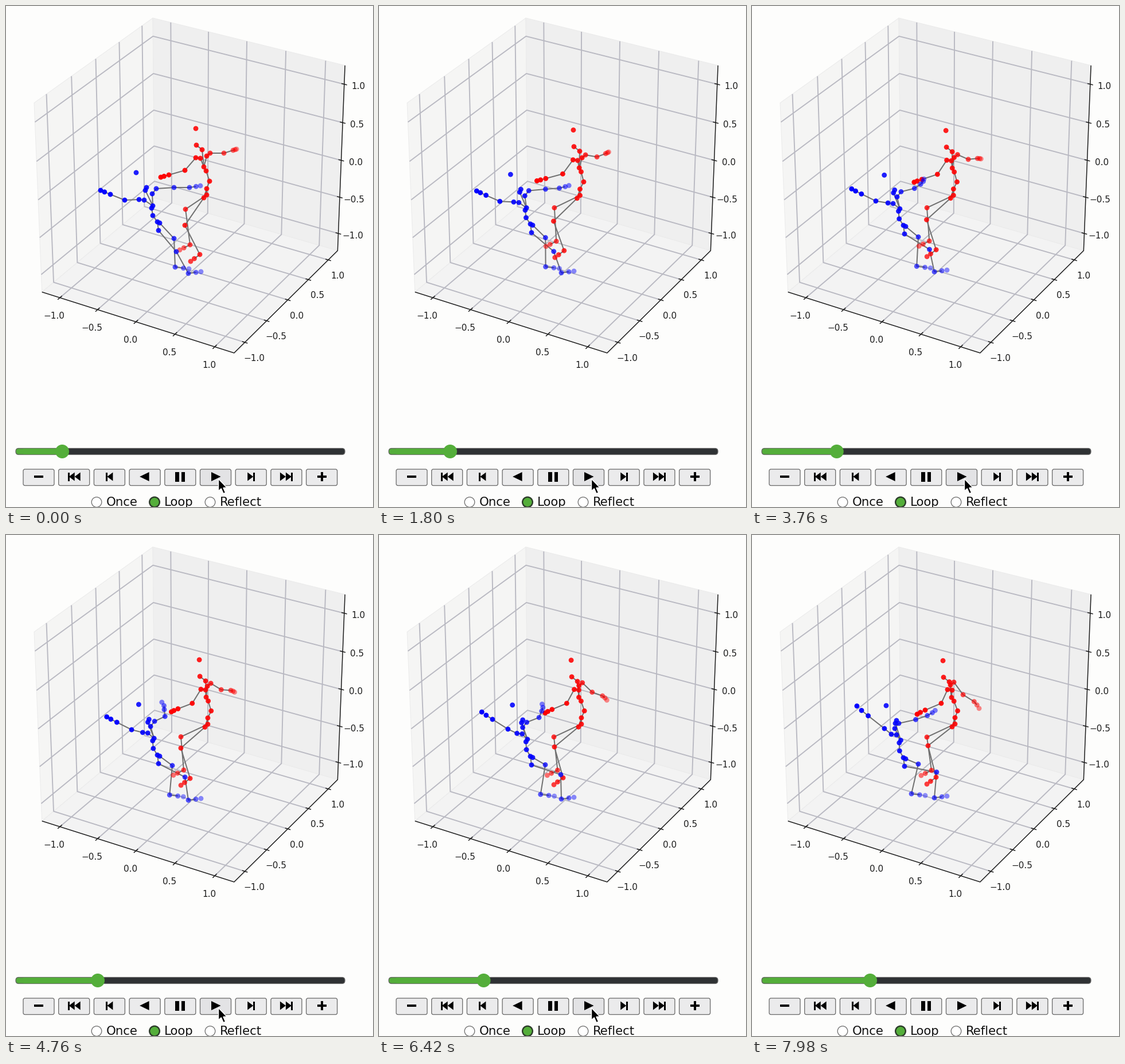
A matplotlib script that plays this animation: 640x875 px, repeating every 8000 ms.

```python
import numpy as np
import matplotlib.pyplot as plt
from matplotlib.animation import FuncAnimation
from matplotlib.collections import LineCollection, PolyCollection
from matplotlib.patches import Circle, FancyBboxPatch, Polygon

W, H, LOOP, STEP = 640, 875, 8000, 20
PX = 0.72  # points per pixel at 100 dpi
BG, GREEN, DARK = "#fdfdfc", "#54ae3a", "#2f3234"

fig = plt.figure(figsize=(W / 100, H / 100), dpi=100, facecolor=BG)
ax = fig.add_axes([0, 0, 1, 1])
ax.set(xlim=(0, W), ylim=(H, 0))
ax.axis("off")

# ---------- 3D box ----------
ELEV, AZIM = np.radians([30, -60])
EYE = 10      # camera distance in box widths
UNIT = 0.403  # box widths per axis unit


def project(x, y, z):
    """Perspective view of a point in a box that spans -0.5 to 0.5."""
    se, ce, sa, ca = np.sin(ELEV), np.cos(ELEV), np.sin(AZIM), np.cos(AZIM)
    right = -sa * x + ca * y
    up = -se * ca * x - se * sa * y + ce * z
    depth = EYE - (ce * ca * x + ce * sa * y + se * z)
    return np.array([324.5 + 3868 * right / depth, 303.5 - 3772 * up / depth])


A, B = -0.5, 0.5
square = [(A, A), (A, B), (B, B), (B, A)]
panes = [[project(A, u, v) for u, v in square],
         [project(u, B, v) for u, v in square],
         [project(u, v, A) for u, v in square]]
ax.add_collection(PolyCollection(panes, facecolors=["#f5f5f4", "#efefef", "#f3f3f3"],
                                 edgecolors="#ebebeb", linewidths=PX))

# each grid line runs from its tick over two panes; then the label offset
axes3d = [
    (lambda v: [(v, A, A), (v, B, A), (v, B, B)], (-10, 32)),
    (lambda v: [(B, v, A), (A, v, A), (A, v, B)], (16, 28)),
    (lambda v: [(B, B, v), (A, B, v), (A, A, v)], (25, 4)),
]
grid, ticks = [], []
for path, offset in axes3d:
    for v in np.linspace(-1, 1, 5):
        line = [project(*p) for p in path(v * UNIT)]
        grid.append(line)
        tick = line[0]
        d = (line[1] - tick) / np.hypot(*(line[1] - tick))
        ticks.append([tick - 5 * d, tick + 5 * d])
        ax.text(*(tick + offset), f"{v:.1f}".replace("-", "\u2212"), fontsize=15.2 * PX,
                family="DejaVu Sans", color="#1a1a1a", ha="center", va="center")
ax.add_collection(LineCollection(grid, colors="#b9b9c2", linewidths=1.9 * PX))
rim = [project(*p) for p in ((A, A, A), (B, A, A), (B, B, A), (B, B, B))]
ax.add_collection(LineCollection([rim] + ticks, colors="#1c1c1c", linewidths=1.5 * PX))


# ---------- two skeletons ----------
def phases(t):
    """Weights of the quick first step, the slow drift and the passing wave."""
    return np.array([1 - np.exp(-t / 800), (t / LOOP) ** 1.4,
                     np.exp(-((t - 5300) / 1300) ** 2 / 2)])


class Limb:
    """Joints that shift with a few anchors; spread places them between these."""

    def __init__(self, points, moves, spread):
        self.points = np.array(points, float)
        if len(points) < len(spread):  # hand or foot before the end point
            a, b = self.points[-2:]
            self.points = np.insert(self.points, -1, a + 0.6 * (b - a), axis=0)
        self.moves = np.array([(m + ((0, 0),))[:3] for m in moves])
        self.spread = spread

    def at(self, t):
        shift = np.tensordot(phases(t), self.moves, (0, 1))
        steps = range(len(shift))
        return self.points + np.transpose([np.interp(self.spread, steps, s) for s in shift.T])


TRUNK = [0, 0, 0, .5, .6, .8, 1]
ARM = [0, 0, 1, 1.55, 1.78, 2]
LEG = [0, 1, 2, 2, 2]

# moves: (first step, drift[, wave]) per anchor
red_hip = ((0, 1), (4, -1))
red = [
    Limb([(331, 214), (332, 243), (342, 251), (345, 281), (349, 288), (355, 306), (350, 319)],
         [((10, 2.5), (-8, 3)), red_hip], TRUNK),
    Limb([(339, 266), (331, 265), (312, 287), (284, 295), (270, 299)],
         [((8, 4), (2, 1)), ((8, 7), (10, 0)), ((4, 6), (13, 8), (9, 0))], ARM),
    Limb([(350, 262), (356, 257), (380, 257), (396, 252), (402, 250)],
         [((6, 4), (-10, -4)), ((2, 5), (-14, 17)), ((-1, -2), (-5, 55))], ARM),
    Limb([(350, 330), (313, 355), (321, 417), (303, 426)],
         [red_hip, ((-8, -3), (0, 1)), ((-14, -7), (6, 1))], LEG),
    Limb([(345, 335), (312, 383), (338, 434), (322, 446)],
         [red_hip, ((-9, -7), (4, -8)), ((-17, -7), (0, -4))], LEG),
]
blue_hip = ((0, 3), (0, 9))
blue = [
    Limb([(227, 291), (245, 317), (243, 322), (256, 349), (254, 353), (256, 366), (264, 377)],
         [((2, 3), (5, 4)), blue_hip], TRUNK),
    Limb([(241, 339), (232, 338), (207, 339), (182, 329), (165, 322)],
         [((2, 4), (9, 6)), ((1, 3), (23, -4)), ((4, 5), (14, -29), (0, 5))], ARM),
    Limb([(255, 328), (262, 319), (293, 317), (320, 317), (339, 314)],
         [((0, 3), (-6, 7)), ((-2, 3), (-4, 3), (-13, -5)),
          ((-6, 1), (-6, -6), (-64, -22))], ARM),
    Limb([(268, 379), (293, 406), (295, 456), (319, 459)],
         [blue_hip, ((-3, -1), (0, -5)), ((-3, 0), (-14, -4))], LEG),
    Limb([(266, 392), (297, 429), (318, 467), (340, 464)],
         [blue_hip, ((6, 2), (19, -17)), ((0, 0), (0, -8))], LEG),
]


def bone_lines(limbs):
    """Spine from the head down, limbs from chest or pelvis; end points stay loose."""
    trunk, *rest = limbs
    roots = (trunk[3], trunk[3], trunk[6], trunk[6])
    return [trunk[1:]] + [np.vstack([r, limb[:-1]]) for r, limb in zip(roots, rest)]


def shades(rgb, limbs, ends):
    """Far parts are paler: opacity runs to the given value along each limb."""
    alpha = np.concatenate([np.linspace(.88, e, len(l.points)) for l, e in zip(limbs, ends)])
    return [(*rgb, a) for a in alpha]


bodies = [(red, shades((1, 0, 0), red, (.9, 1, .45, .55, .75))),
          (blue, shades((0, 0, 1), blue, (.9, 1, .5, .42, .45)))]
bones = LineCollection([], colors="#707070", linewidths=2 * PX, zorder=4)
ax.add_collection(bones)
dots = [ax.scatter(*np.vstack([l.points for l in limbs]).T, s=(8.8 * PX) ** 2,
                   linewidths=0, zorder=5, c=colours) for limbs, colours in bodies]


# ---------- player controls ----------
def rounded(x0, y0, x1, y1, r, **style):
    box = FancyBboxPatch((x0 + r, y0 + r), x1 - x0 - 2 * r, y1 - y0 - 2 * r,
                         boxstyle=f"round,pad={r}", **style)
    return ax.add_patch(box)


rounded(17, 772.5, 591, 783.5, 5, fc=DARK, ec="#6a6a6a", lw=1.2 * PX)
rounded(17.5, 773, 90, 783, 4.8, fc=GREEN, ec="#5d7d52", lw=PX)
fill = ax.add_patch(Polygon([(30, 773), (98, 773), (98, 783), (30, 783)], fc=GREEN, ec="none"))
thumb = ax.add_patch(Circle((98, 778), 12, fc=GREEN, ec="none", zorder=3))

PITCH = 61.7
buttons = [rounded(30 + PITCH * i, 809, 84 + PITCH * i, 837.5, 3,
                   fc="#ebebec", ec="#6b6b6b", lw=1.3 * PX) for i in range(9)]
play = buttons[5]


def bar(x0, x1, h=7.5):
    return [(x0, -h), (x1, -h), (x1, h), (x0, h)]


def tri(base, tip, h=7.5):
    return [(base, -h), (base, h), (tip, 0)]


def mirror(shapes):
    return [[(-x, y) for x, y in s] for s in shapes]


skip = [bar(8, 11), tri(-11, -1), tri(-1, 9)]
step = [bar(3.5, 6.5), tri(-6, 4)]
go = [tri(-7.5, 9, 8)]
pause = [bar(-8.5, -2, 8.5), bar(2, 8.5, 8.5)]
minus = [bar(-8, 8, 1.9)]
plus = minus + [bar(-1.9, 1.9, 8)]
icons = [minus, mirror(skip), mirror(step), mirror(go), pause, go, step, skip, plus]
glyphs = [np.array(s) + (57 + PITCH * i, 822) for i, icon in enumerate(icons) for s in icon]
ax.add_collection(PolyCollection(glyphs, facecolors="black", edgecolors="none", zorder=3))

for x, name in ((158, "Once"), (259, "Loop"), (356, "Reflect")):
    on = name == "Loop"
    ax.add_patch(Circle((x, 866.5), 8.8, fc=GREEN if on else "white",
                        ec="#2c3a2a" if on else "#6f6f6f", lw=(2.4 if on else 1.3) * PX))
    ax.text(x + 16.5, 873, name, fontsize=21.3 * PX, family="DejaVu Sans", color="#111111")

arrow = [(0, 0), (0, 21), (4.8, 16.8), (8.6, 25.5), (12.2, 24), (8.4, 15.4), (14.6, 15.2)]
cursor = ax.add_patch(Polygon(np.array(arrow) + (370.5, 826), fc="black", ec="white",
                              lw=1.4 * PX, zorder=6))

# ---------- timing ----------
# 18 updates in every 840 ms, then a short rest
bursts = [np.linspace(-20, 720, 18) + 840 * k for k in range(10)]
beats = np.clip(np.round(np.concatenate(bursts) / STEP) * STEP, 0, None)
POINTER_GONE = 7300


def update(i):
    t = beats[np.searchsorted(beats, i * STEP, "right") - 1]
    lines = []
    for dot, (limbs, _) in zip(dots, bodies):
        pose = [limb.at(t) for limb in limbs]
        dot.set_offsets(np.vstack(pose))
        lines += bone_lines(pose)
    bones.set_segments(lines)

    x = np.interp(t, [0, 1800, 5720, 7980], [98, 124, 172, 206])
    thumb.center = (x, 778)
    fill.set_xy([(30, 773), (x, 773), (x, 783), (30, 783)])

    hover = t < POINTER_GONE
    cursor.set_visible(hover)
    play.set_facecolor("#e3e3e5" if hover else "#ebebec")
    return [*dots, bones, thumb, fill, cursor, play]


anim = FuncAnimation(fig, update, frames=LOOP // STEP, interval=STEP,
                     repeat=True, repeat_delay=0, blit=False)
plt.show()
```
